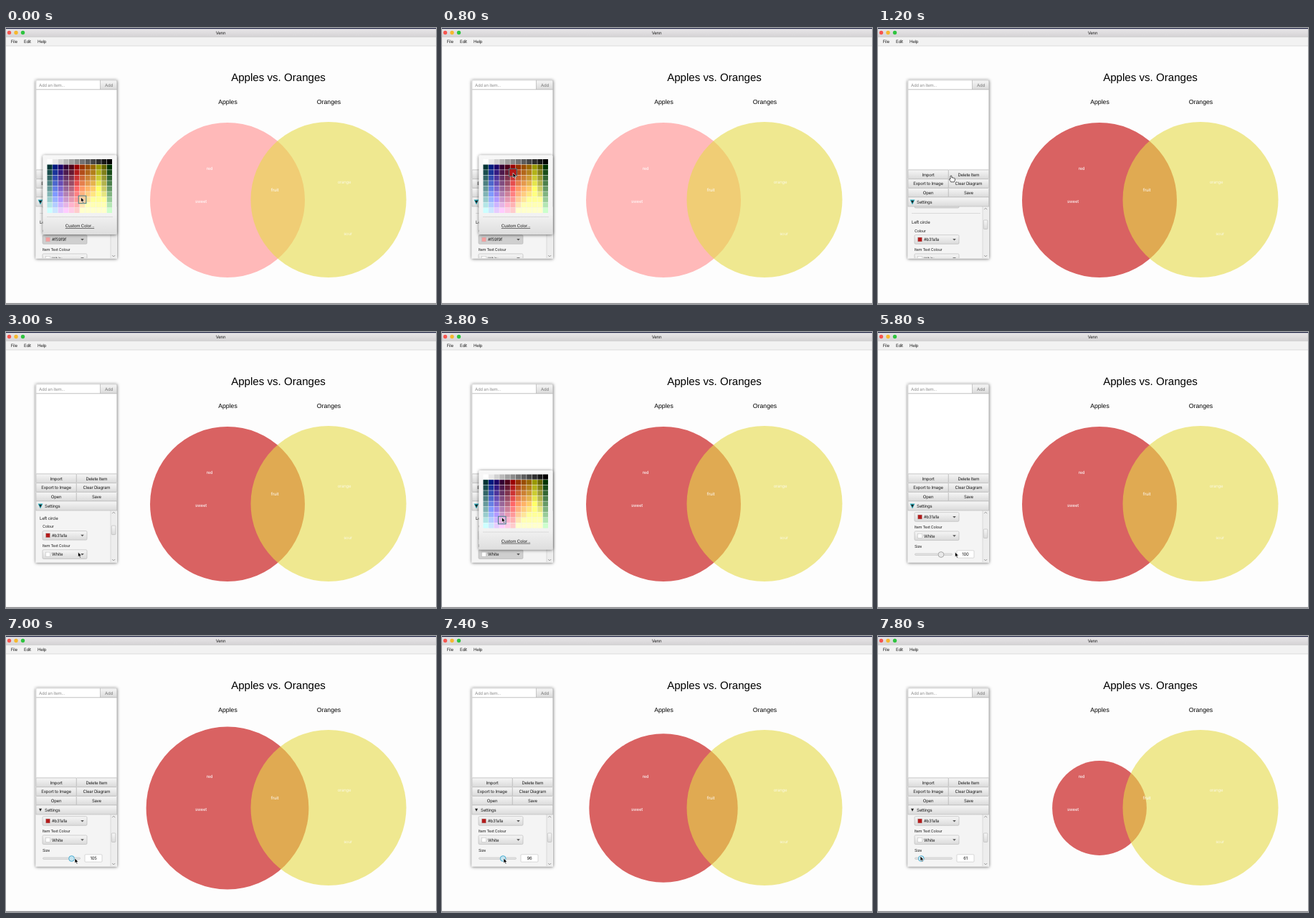
Recreate the animation shown at these times as an HTML page. Size 600x385 px, loop 8 s.

```html
<!DOCTYPE html>
<html lang="en">
<head>
<meta charset="utf-8">
<title>Venn</title>
<style>
  html, body { margin: 0; width: 100%; height: 100%; overflow: hidden; background: #fdfdfd; }
  svg { display: block; width: 600px; height: 385px; }
  text { font: 6px Inter, sans-serif; letter-spacing: -.22px; fill: #1c1c1c; text-rendering: geometricPrecision; white-space: pre; }
  .heading text { font-family: "Liberation Sans", Arial, sans-serif; letter-spacing: 0; fill: #000; }
  .small { font-size: 5.4px; }
  .mid { text-anchor: middle; }
  .items text { fill: #fff; }
  .line { stroke: #c9c9c9; stroke-width: .6; }
  .box { fill: url(#button); stroke: #b4b4b4; stroke-width: .6; }
  .field { fill: #fff; stroke: #c2c2c2; stroke-width: .6; }
</style>
</head>
<body>
<svg viewBox="0 0 600 385">
  <defs>
    <linearGradient id="bar" x2="0" y2="1"><stop stop-color="#ebe9eb"/><stop offset="1" stop-color="#d3d1d3"/></linearGradient>
    <linearGradient id="button" x2="0" y2="1"><stop stop-color="#f6f6f6"/><stop offset="1" stop-color="#dadada"/></linearGradient>
    <linearGradient id="sheet" x2="0" y2="1"><stop stop-color="#f7f7f7"/><stop offset=".75" stop-color="#f2f2f2"/><stop offset="1" stop-color="#dedede"/></linearGradient>
    <filter id="shadow" x="-20%" y="-20%" width="140%" height="140%"><feDropShadow dx="0" dy=".6" stdDeviation="2" flood-opacity=".6"/></filter>
    <filter id="blur" x="-50%" y="-50%" width="200%" height="200%"><feGaussianBlur stdDeviation=".7"/></filter>
    <clipPath id="view"><rect x="42" y="249" width="112.500" height="72"/></clipPath>
  </defs>

  <rect width="600" height="385" fill="#fdfdfd"/>
  <rect width="600" height="13" fill="url(#bar)"/>
  <rect width="600" height="1.200" fill="#1b2040"/>
  <rect y="12.500" width="600" height="12.500" fill="#f2f2f2"/>
  <path d="M0 12.500H600M0 25H600" class="line"/>
  <rect y="383.800" width="600" height="1.200" fill="#858589"/>
  <circle cx="4.500" cy="6.500" r="2.700" fill="#f65650"/>
  <circle cx="14" cy="6.500" r="2.700" fill="#f6b82e"/>
  <circle cx="23.500" cy="6.500" r="2.700" fill="#2fc440"/>
  <text class="mid" x="299.500" y="9">Venn</text>
  <text x="6.800" y="21">File</text>
  <text x="25" y="21">Edit</text>
  <text x="44" y="21">Help</text>

  <g class="heading mid">
    <text x="380" y="73.700" style="font-size:15.100px">Apples vs. Oranges</text>
    <text x="309.500" y="106" style="font-size:8.700px">Apples</text>
    <text x="450.500" y="106" style="font-size:8.700px">Oranges</text>
  </g>
  <circle id="left" cx="309" cy="240"/>
  <circle cx="450" cy="239.500" r="108.500" fill="rgb(231,218,73)" fill-opacity=".6"/>
  <g class="items mid">
    <text x="284" y="198.300">red</text>
    <text x="272" y="244">sweet</text>
    <text x="375" y="227.700">fruit</text>
    <g opacity=".72"><text x="472" y="217">orange</text><text x="477" y="288.500">sour</text></g>
  </g>

  <rect x="41.500" y="72.500" width="113.500" height="249" fill="#f4f4f4" filter="url(#shadow)"/>
  <rect class="field" x="42" y="73" width="89.500" height="12.700"/>
  <text x="46" y="81.500" style="fill:#8e8e8e">Add an item...</text>
  <rect class="box" x="131.500" y="73" width="23.300" height="12.700"/>
  <text class="mid" x="143.500" y="81.500" style="fill:#777">Add</text>
  <rect class="field" x="42" y="86" width="112.700" height="112"/>
  <g id="buttons"></g>

  <g clip-path="url(#view)">
    <g id="content">
      <rect class="box" x="51" y="238" width="62" height="13" rx="1.500"/>
      <path class="line" d="M47 258.500H143"/>
      <text x="47" y="273">Left circle</text>
      <text class="small" x="51" y="284.500">Colour</text>
      <g id="fillCombo" transform="translate(51 288.700)"></g>
      <text class="small" x="51" y="311.300">Item Text Colour</text>
      <g id="textCombo" transform="translate(51 315)"></g>
      <text class="small" x="51" y="338">Size</text>
      <rect x="51.500" y="346" width="52" height="2.500" rx="1.200" fill="#e3e3e3" stroke="#b5b5b5" stroke-width=".5"/>
      <circle id="thumb" cy="347.500" r="3.900" stroke-width=".8"/>
      <rect class="field" x="110" y="341.800" width="24" height="10.400" rx="1"/>
      <text id="size" class="mid" x="122" y="349.200"></text>
    </g>
    <rect x="146" y="249" width="8.500" height="72" fill="#ededed"/>
    <path d="M146 249V321" class="line"/>
    <path d="M148.200 253.200L150.200 251.200L152.200 253.200M148.200 317L150.200 319L152.200 317" fill="none" stroke="#777" stroke-width=".7"/>
    <rect id="scroller" class="box" x="147.300" y="268" width="5.600" height="12.500" rx="1"/>
  </g>

  <rect class="box" x="42" y="236" width="112.700" height="13"/>
  <path id="glow" d="M44.600 239.600H51.400L48 246.400Z" fill="#25aebe" filter="url(#blur)"/>
  <path d="M46 240.800H50L48 244.800Z" fill="#222"/>
  <text x="54" y="245">Settings</text>

  <g id="popup">
    <rect x="51.500" y="177.500" width="103" height="110.500" rx="2" fill="url(#sheet)" filter="url(#shadow)"/>
    <g id="cells"></g>
    <path class="line" d="M57 263.500H149"/>
    <text class="mid" x="103" y="278.200" text-decoration="underline">Custom Color...</text>
    <rect id="hover"/>
  </g>

  <path id="arrow" d="M0 0V6.800L1.600 5.400L2.700 7.900L3.900 7.400L2.800 5H4.900Z" fill="#000" stroke="#fff" stroke-width=".6"/>
  <path id="hand" d="M-1 .6Q0-.8 1 .6V3Q2 2.300 2.800 3.200Q3.800 2.700 4.300 3.700Q5.400 3.400 5.500 4.600Q5.500 7 4.300 8.800H-.3Q-1.200 6.800-2.800 5.200Q-2.300 4-1 5Z" fill="#fff" stroke="#111" stroke-width=".7"/>
</svg>
<script>
const LOOP = 8000, STEP = 200;
const CELL = 7.58, GRID_X = 57.5, GRID_Y = 183;
const $ = id => document.getElementById(id);
const set = (id, attrs) => Object.entries(attrs).forEach(([key, value]) => $(id).setAttribute(key, value));
const show = (id, on) => { $(id).style.display = on ? '' : 'none'; };

const buttons = [['Import', 'Delete Item'], ['Export to Image', 'Clear Diagram'], ['Open', 'Save']];
$('buttons').innerHTML = buttons.flatMap((row, r) => row.map((label, c) => {
  const x = 42 + c * 56.4, y = 198 + r * 12.7;
  return `<rect class="box" x="${x}" y="${y}" width="56.3" height="12.6" rx="1"/>
    <text class="mid" x="${x + 28}" y="${y + 8.6}">${label}</text>`;
})).join('');

const combo = (id, label, colour) => `
  <rect id="${id}Box" class="box" width="62" height="12.6" rx="1.5"/>
  <rect id="${id}Swatch" x="4.5" y="3.3" width="6" height="6" fill="${colour}" stroke="#bbb" stroke-width=".5"/>
  <text id="${id}Label" x="13" y="8.5">${label}</text>
  <path d="M53.2 5.200H57.800L55.500 7.800Z" fill="#555"/>`;
$('fillCombo').innerHTML = combo('fill', '', '');
$('textCombo').innerHTML = combo('text', 'White', '#fff');

// The darkest shade of each column; every row below is one step lighter.
const shades = ['#003333', '#001a80', '#1a0068', '#330033', '#4d001a', '#990000',
  '#993300', '#994d00', '#996600', '#999900', '#666600', '#003300'];
const cellColour = (col, row) => {
  if (!row) {
    const grey = Math.round(255 * (1 - col / 11));
    return `rgb(${grey},${grey},${grey})`;
  }
  const base = parseInt(shades[col].slice(1), 16);
  const mix = [16, 8, 0].map(shift => Math.min(255, (base >> shift & 255) + 25.5 * (row - 1)));
  return `rgb(${mix.map(Math.round)})`;
};
const cells = [];
for (let row = 0; row < 10; row++)
  for (let col = 0; col < 12; col++)
    cells.push(`<rect x="${GRID_X + col * CELL}" y="${GRID_Y + row * 7.55}" width="7.1" height="7.05" fill="${cellColour(col, row)}"/>`);
$('cells').innerHTML = cells.join('');

// Keys are [time, value, value, ...], joined by straight lines.
const pointer = [[0, 104.5, 236], [200, 104, 233], [600, 99, 203], [800, 99, 202], [1200, 102, 206],
  [1400, 102, 218], [1800, 101, 272], [2400, 100, 296], [3000, 100.5, 307], [3400, 101, 308],
  [4200, 66, 209], [4600, 63, 203.5], [4800, 63, 204], [5200, 92, 276], [5800, 107.5, 307],
  [6200, 92, 309], [6400, 90, 310], [6800, 92, 310], [7000, 96, 310], [7200, 101, 311],
  [7400, 86, 310], [7600, 70, 309], [7800, 59, 307]];
const scroll = [[0, 0], [1800, 0], [2400, 11.2], [4800, 11.2], [5400, 37]];
const sizes = [[0, 100], [6600, 100], [7000, 105], [7200, 113], [7400, 96], [7600, 76], [7800, 61]];

function sample(keys, t) {
  const next = keys.findIndex(key => key[0] > t);
  if (next < 0) return keys[keys.length - 1].slice(1);
  const a = keys[next - 1], b = keys[next];
  const k = (t - a[0]) / (b[0] - a[0]);
  return a.slice(1).map((value, i) => value + (b[i + 1] - value) * k);
}

function draw(t) {
  const [x, y] = sample(pointer, t);
  const [offset] = sample(scroll, t);
  const size = Math.round(sample(sizes, t)[0]);
  const picked = t >= 1000;
  const fillOpen = !picked;
  const textOpen = t >= 3400 && t < 4800;
  const sliding = t >= 6400;
  const drop = textOpen ? 15.6 : 0;

  set('left', { r: size * 1.08, fill: picked ? '#d96262' : '#ffb9b9' });
  set('content', { transform: `translate(0 ${-offset})` });
  set('scroller', { y: 268 + offset * .19 });
  set('fillSwatch', { fill: picked ? '#b31a1a' : '#f59f9f' });
  $('fillLabel').textContent = picked ? '#b31a1a' : '#f59f9f';
  $('fillBox').style.fill = fillOpen ? '#cfcfcf' : '';
  $('textBox').style.fill = textOpen ? '#cfcfcf' : '';
  set('thumb', { cx: 88 + (size - 100) * .71, fill: sliding ? '#c4e4f0' : '#e9e9e9', stroke: sliding ? '#2d9fc9' : '#9a9a9a' });
  $('size').textContent = size;
  show('glow', !sliding);

  show('popup', fillOpen || textOpen);
  set('popup', { transform: `translate(0 ${drop})` });
  const col = Math.floor((x + 1 - GRID_X) / CELL);
  const row = Math.floor((y + 1 - GRID_Y - drop) / 7.55);
  const inside = col >= 0 && col < 12 && row >= 0 && row < 10;
  show('hover', inside);
  if (inside) {
    const side = row ? 10.6 : 11;
    set('hover', {
      x: GRID_X + (col + .47) * CELL - side / 2, y: GRID_Y + (row + .47) * 7.55 - side / 2,
      width: side, height: side, fill: cellColour(col, row),
      stroke: row ? '#3f7f88' : '#2ba3cb', 'stroke-width': row ? 1 : 1.5
    });
  }

  const overButtons = picked && t < 1600;
  show('hand', overButtons);
  show('arrow', !overButtons);
  set(overButtons ? 'hand' : 'arrow', { transform: `translate(${x} ${y})` });
}

function tick() {
  const t = performance.now() % LOOP;
  draw(Math.floor(t / STEP) * STEP);
  requestAnimationFrame(tick);
}
tick();
</script>
</body>
</html>
```
